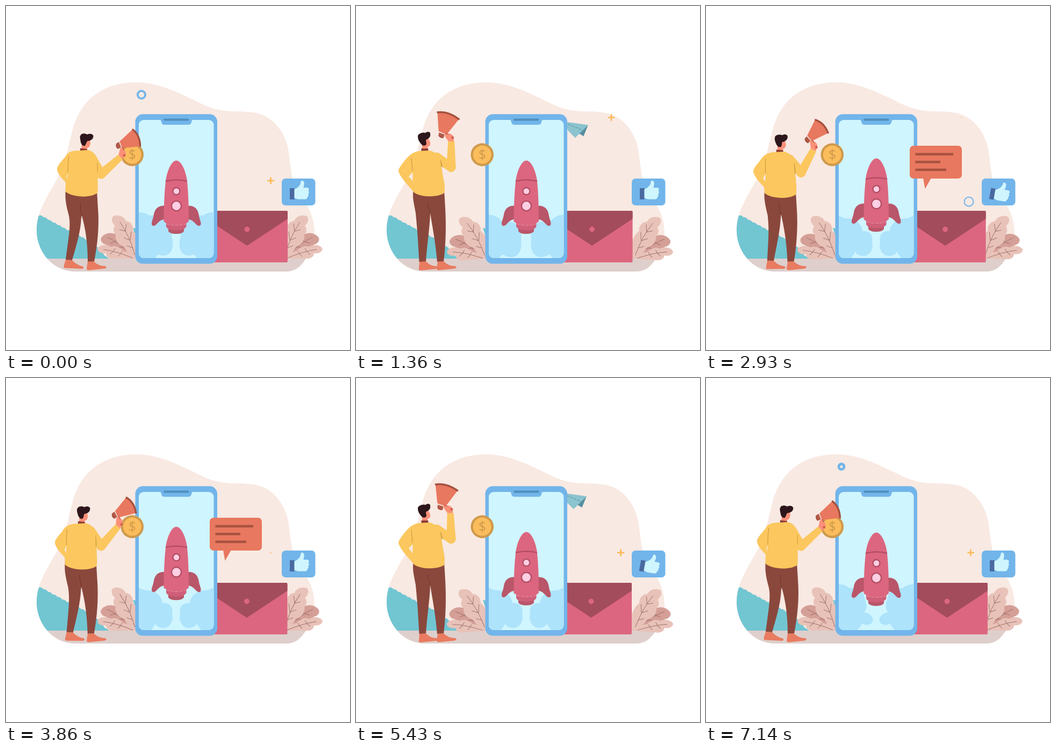
An HTML page with a canvas that plays this animation: 640x640 px, repeating every 7210 ms.

```html
<!DOCTYPE html>
<html lang="en">
<head>
<meta charset="utf-8">
<title>Rocket launch campaign</title>
<style>
html, body { margin: 0; width: 100%; height: 100%; overflow: hidden; background: #fff; }
canvas { display: block; width: 640px; height: 640px; }
</style>
</head>
<body>
<canvas id="stage"></canvas>
<script>
const LOOP = 7210, HALF = LOOP / 2, QUARTER = LOOP / 4;
const canvas = document.getElementById('stage');
const ctx = canvas.getContext('2d');
const dpr = window.devicePixelRatio || 1;
canvas.width = canvas.height = 640 * dpr;

const C = {
  blob: '#f8e9e2', ground: '#decfcc', teal: '#71c6d2', blue: '#72b5ea', bar: '#4f8fbd',
  screen: '#cff5ff', cloud: '#ade3fb', pink: '#dc667f', wine: '#b95669', ring: '#b34d65',
  glass: '#ffcfe3', flap: '#a34c5c', gold: '#cf9a4c', amber: '#fbbd5c', shirt: '#fbc75e',
  crease: '#c8963f', brown: '#8a483d', skin: '#fb9079', shoe: '#e97b60', hair: '#2d161b',
  horn: '#e8785f', rust: '#a4513f', leaf: '#e8c2b8', leafDark: '#d49f97', vein: '#a0736c',
  cuff: '#4a69a0', plus: '#fbba55', plane: '#8bc3cf', planeDark: '#568fa0'
};

// Helpers
const clamp = (v, a = 0, b = 1) => Math.min(b, Math.max(a, v));
const mix = (a, b, k) => a + (b - a) * k;
const smooth = (a, b, t) => { const k = clamp((t - a) / (b - a)); return k * k * (3 - 2 * k); };

function fill(path, color) {
  ctx.fillStyle = color;
  ctx.fill(new Path2D(path));
}
function line(path, color, width, cap = 'butt') {
  ctx.strokeStyle = color;
  ctx.lineWidth = width;
  ctx.lineCap = cap;
  ctx.lineJoin = 'round';
  ctx.stroke(new Path2D(path));
}
function disc(x, y, r, color) {
  ctx.fillStyle = color;
  ctx.beginPath();
  ctx.arc(x, y, r, 0, 7);
  ctx.fill();
}
function box(x, y, w, h, r, color) {
  ctx.fillStyle = color;
  ctx.beginPath();
  ctx.roundRect(x, y, w, h, r);
  ctx.fill();
}
function group(draw) {
  ctx.save();
  draw();
  ctx.restore();
}
function spin(x, y, deg) {
  ctx.translate(x, y);
  ctx.rotate(deg * Math.PI / 180);
  ctx.translate(-x, -y);
}
function mirror(axis) {
  ctx.translate(axis * 2, 0);
  ctx.scale(-1, 1);
}
// Blends two paths that share the same commands
function morph(p, q, k) {
  const to = q.match(/-?[\d.]+/g);
  let i = 0;
  return p.replace(/-?[\d.]+/g, n => mix(+n, +to[i++], k).toFixed(2));
}
// Monotone curve through [time, value] keys
function track(keys, t) {
  const n = keys.length - 1;
  if (t <= keys[0][0]) return keys[0][1];
  if (t >= keys[n][0]) return keys[n][1];
  const slope = i => (keys[i + 1][1] - keys[i][1]) / (keys[i + 1][0] - keys[i][0]);
  const tangent = i => {
    if (i === 0 || i === n) return 0;
    const a = slope(i - 1), b = slope(i);
    return a * b <= 0 ? 0 : 2 * a * b / (a + b);
  };
  let i = 0;
  while (t > keys[i + 1][0]) i++;
  const [t0, v0] = keys[i], [t1, v1] = keys[i + 1];
  const d = t1 - t0, k = (t - t0) / d, k2 = k * k, k3 = k2 * k;
  return (2 * k3 - 3 * k2 + 1) * v0 + (k3 - 2 * k2 + k) * d * tangent(i)
    + (3 * k2 - 2 * k3) * v1 + (k3 - k2) * d * tangent(i + 1);
}

// Backdrop
const BLOB = 'M243 142C285 142 325 163 366 183C410 203 430 192 465 199C498 205 521 237 526 272'
  + 'C531 310 531 335 556 366C570 385 574 405 574 425C573 440 565 460 558 470C548 485 538 494 522 494'
  + 'H130C85 494 57 455 57 417C57 380 80 350 97 318C112 288 117 255 124 230C140 170 185 142 243 142Z';
const SLOPE = [[58, 390], [88, 403.5], [119, 420], [145, 433], [170, 450], [192, 470]];

function grassPath() {
  let d = 'M50 470L50 389';
  for (let x = 58; x <= 192; x += 2) {
    d += `L${x} ${track(SLOPE, x) - 1.8 * Math.abs(Math.sin(x * 0.36))}`;
  }
  return d + 'L192 470Z';
}
const GRASS = grassPath();

function backdrop() {
  fill(BLOB, C.blob);
  group(() => {
    ctx.clip(new Path2D(BLOB));
    fill(GRASS, C.teal);
    ctx.fillStyle = C.ground;
    ctx.fillRect(50, 470, 530, 24);
  });
  fill('M236 413L248 415V445L241 428Z', C.teal);
}

function leaves(sway) {
  spin(240, 470, -5 * sway);
  fill('M250 470C225 470 205 465 198 458C190 457 186 448 187 444C178 443 174 434 178 430C184 422 198 420 206 426C214 424 222 432 224 440C232 446 240 458 250 470Z', C.leafDark);
  line('M188 430Q212 440 238 468M205 438L208 429M205 438L194 441M218 448L219 438M218 448L206 450', C.vein, 1);
  fill('M250 470L242 470C232 464 222 456 220 448C210 446 202 436 204 425C198 420 200 412 203 409C195 402 195 392 202 390C210 388 220 392 223 400C232 400 238 410 236 418C248 428 252 450 250 470Z', C.leaf);
  line('M212 402Q230 428 240 464M222 419L211 416M222 419L224 405M231 436L219 431M231 436L233 420M236 450L225 446', C.vein, 1);
  fill('M250 470L196 470C188 468 186 464 186 460C176 462 168 455 171 450C176 444 188 443 195 448C204 444 214 450 218 456C228 458 240 462 250 470Z', C.leaf);
  line('M181 453Q205 456 236 469M199 457L203 451M199 457L193 462M213 461L216 456M213 461L208 466', C.vein, 1);
}

function envelope(sway) {
  ctx.translate(-11 * sway, 0);
  box(373, 381, 151, 96, 2, C.pink);
  fill('M373 383Q373 381 375 381H522Q524 381 524 383V396L448.5 446L373 396Z', C.flap);
  disc(448.5, 415.5, 5, C.pink);
}

const PLANE = [[1050, -60], [1450, 12], [1825, 0], [1930, -22], [2050, -60]];
function paperPlane(t) {
  const d = track(PLANE, t);
  if (d < -45) return;
  ctx.translate(d, Math.max(d, -22) * 0.45);
  fill('M429 220L420.5 241L412 236Z', C.planeDark);
  fill('M385 214L429 220L405 244L392 231Z', C.plane);
  ctx.setLineDash([5, 2]);
  line('M392 219L420 230', C.planeDark, 1);
}

// Phone
const PUFF = {
  full: 'M240 480L240 386C250 381 262 386 267 390C280 388 292 390 300 395C312 405 309 420 308 428C312 440 311 456 303 461C296 466 288 465 284 462C280 464 279 468 276 475Z',
  soft: 'M240 480L240 387C250 385 262 387 272 391C285 389 295 392 300 397C309 405 307 420 307 428C312 440 312 456 305 461C298 467 288 467 280 461C276 465 274 467 272 475Z',
  round: 'M240 480L240 390C252 389 265 393 271 410C282 408 296 411 302 419C308 428 308 436 307 444C306 456 300 466 290 469C282 470 274 468 268 463C264 464 262 467 258 475Z',
  rest: 'M240 480L240 386C250 392 258 396 264 395C282 397 290 408 291 419C302 417 312 425 309 438C313 455 302 466 291 465C284 464 280 462 278 457C274 464 270 470 262 475Z',
  split: 'M240 480L240 386C250 381 262 386 267 391C278 389 288 392 293 402C294 412 304 424 294 436C310 438 316 452 305 458C298 461 294 459 291 456C288 464 282 468 274 475Z'
};
const PUFFS = [[0, 'full'], [710, 'soft'], [1930, 'round'], [2930, 'rest'], [5600, 'rest'], [7140, 'split'], [LOOP, 'full']];

function clouds(t) {
  let i = 0;
  while (t > PUFFS[i + 1][0]) i++;
  const [t0, a] = PUFFS[i], [t1, b] = PUFFS[i + 1];
  const path = morph(PUFF[a], PUFF[b], (t - t0) / (t1 - t0));
  fill(path, C.cloud);
  group(() => { mirror(316.5); fill(path, C.cloud); });
}

function rocket(t) {
  const u = clamp((t - 4000) / 1800, -1, 1);
  ctx.translate(0, -5.5 * (1 + Math.cos(u * Math.PI)));
  const fin = () => fill('M296 371.5C283 371 277 377 275 388C274 396 271 400 271 405C271 409.5 275 410.5 279 407C284 402 286 398 296 396.5Z', C.wine);
  fin();
  group(() => { mirror(316.8); fin(); });
  fill('M302 413H331V419Q328 424 316.5 424Q305 424 302 419Z', C.wine);
  fill('M298 403H335.5V410Q333 417 316.5 417.5Q300 417 298 410Z', '#cf5f78');
  fill('M317 287.5C327 288 335 309 337 326C339.5 350 340 375 340 401C330 410 304 410 293.5 401C293.5 375 294.5 350 297 326C299 309 307 288 317 287.5Z', C.pink);
  group(() => {
    ctx.setLineDash([6, 2]);
    line('M299 405.5Q317 411 335 405.5', '#eea3b4', 0.8);
  });
  line('M297 326Q317 321 337 326', C.ring, 2.5);
  for (const [y, r] of [[344.5, 7.7], [372, 10.3]]) {
    disc(317, y, r, C.ring);
    disc(317, y, r - 2.4, C.glass);
  }
}

function phone(t) {
  box(240.5, 201.3, 152.5, 278.3, 14, C.blue);
  group(() => {
    ctx.beginPath();
    ctx.roundRect(247, 212, 139.5, 257, 9);
    ctx.fillStyle = C.screen;
    ctx.fill();
    ctx.clip();
    clouds(t);
  });
  fill('M286 210Q288 212 289 216Q290 221 295 221H339Q344 221 345 216Q346 212 348 210Z', C.blue);
  line('M295 211.5H338.5', C.bar, 3.8, 'round');
  group(() => rocket(t));
}

// Floating items
function coin(t) {
  const k = 1 + 0.15 * Math.sin(Math.PI * clamp((t % QUARTER - 400) / 600));
  ctx.translate(234.8, 276.6);
  ctx.scale(k, k);
  disc(0, 0, 21.3, C.gold);
  disc(0, 0, 17, C.amber);
  ctx.fillStyle = C.gold;
  ctx.font = '25px "Open Sans", "Noto Sans", sans-serif';
  ctx.textAlign = 'center';
  ctx.fillText('$', 0, 8.6);
}

function bubble(t) {
  const k = smooth(2150, 2450, t) - smooth(4500, 4800, t);
  if (k <= 0) return;
  ctx.translate(408, 340);
  ctx.scale(k, k);
  ctx.translate(-408, -340);
  box(379, 260, 97, 61, 7, C.horn);
  fill('M404 320H419L407.5 340Z', C.horn);
  line('M389.5 275.7H460M389.5 290.3H436M389.5 304.7H447', '#a85241', 4.6);
}

function thumb(t) {
  const p = t % (LOOP / 3);
  box(513, 321, 62.5, 50, 7, C.blue);
  spin(532, 352, 10 * (smooth(100, 500, p) - smooth(750, 1150, p)));
  ctx.fillStyle = C.cuff;
  ctx.fillRect(528, 339, 8.7, 20.8);
  fill('M536.5 341C544 338 548 333 548.5 327C549 324 553 324 554.5 328C555.5 332 553.5 336 553.5 338H560C564 338 564.5 342 562.5 344C564.5 346 564 349 562 350C563.5 352 562.5 355 560.5 355.5C561 358 559 359.5 556 359.5H545C541 359.5 540 358 536.5 357.5Z', C.screen);
}

const SPOTS = [[252, 165], [423, 304], [489, 364]];
const RINGS = [[-160, 0], [310, 1], [810, 2], [1640, 0], [2140, 1], [2640, 2], [3900, 0],
  [4400, 1], [4900, 2], [5480, 0], [5980, 1], [6480, 2], [7050, 0]];
function rings(t) {
  for (const [born, spot] of RINGS) {
    const age = t - born;
    if (age <= 0 || age >= 440) continue;
    const outer = 9.5 * (1 - (1 - age / 440) ** 6.5);
    const width = Math.min(outer, (440 - age) / 72);
    ctx.strokeStyle = C.blue;
    ctx.lineWidth = width;
    ctx.beginPath();
    ctx.arc(...SPOTS[spot], outer - width / 2, 0, 7);
    ctx.stroke();
  }
}

function pluses(t) {
  const p = t % QUARTER;
  for (const [x, y, peak] of [[492.5, 325, 0], [298.5, 158, 700], [475, 207.5, 1400]]) {
    const off = Math.abs((p - peak + QUARTER * 1.5) % QUARTER - QUARTER / 2);
    const r = 6.5 * Math.cos(Math.min(1, off / 310) * Math.PI / 2);
    if (r > 0.1) line(`M${x - r} ${y}H${x + r}M${x} ${y - r}V${y + r}`, C.plus, r * 0.42);
  }
}

// Man
const BODY = [[0, 0], [255, 0.25], [710, 0.87], [1150, 1], [1930, 1], [2930, 0.44], [HALF, 0]];
const ARM = [[0, 0], [255, 0.15], [710, 0.64], [1150, 0.9], [1825, 0.96], [1950, 1], [2300, 0.88], [2930, 0.39], [HALF, 0]];

function legs(b) {
  fill(morph('M111 342C109 360 113 375 117 390C120 405 118 420 115 442L111 472L123 473C131 445 139 420 140 394L141 390C148 415 152 440 152 476L164 476C170 445 174 410 171 375L169 342Z',
    'M107 342C104 355 108 368 111 385C113 405 115 430 116 450L117.5 476L130 476C132 445 137 415 138 388L138 385C142 410 148 440 151 476L163 476C167 445 168 410 166 375L164 342Z', b), C.brown);
  line(morph('M138 366Q138 376 141 390', 'M133 366Q135 376 138 386', b), '#6d352d', 1);
  fill(morph('M111 472L108 482Q106 487 110 487.5L142 489Q146 487 143 484.5Q131 482 123 473Z',
    'M118 476L117 488Q116 492 120 492L150 489Q154 486 150 484Q138 484 130 475Z', b), C.shoe);
  fill('M152 475.5L150 488.5Q150 492 155 491.5L184 488.5Q189 486 185 484Q172 484 163 475Z', C.shoe);
}

function head(b) {
  fill(morph('M141 256L151 257L151 270L140 270Z', 'M123 255L133 255L133.5 269L123 269Z', b), C.skin);
  fill(morph('M148 250L156.5 250L157 256L155 262Q150 266 147 262Z',
    'M126 246L136 248L138.5 256L137 260Q133 264 126 260Z', b), C.skin);
  fill(morph('M138.5 250Q136 241 141 238Q147 236 151 239Q159 235.5 162.5 241Q163 250 151 251.5L148 258Q147 262 142 259Q139 256 138.5 250Z',
    'M117 251Q113 242 117 238.5Q123 234 129 236Q135 232 138 236Q140 246 130 249L131 257Q130 260 124 259.5Q120 256 117 251Z', b), C.hair);
}

// The bell opens wider as the arm goes up
function megaphone(a) {
  const open = smooth(0.6, 1, a);
  spin(209, 259, -25);
  ctx.translate(209, 259);
  ctx.scale(1 + 0.06 * open, 1 + 0.24 * open);
  ctx.translate(-209, -259);
  spin(209, 259, 25);
  fill('M211.5 252L235.5 229.5Q249 240 250 261L216 264.5Z', C.horn);
  line('M236 230Q249 240 249.7 260.5', C.rust, 3.4, 'round');
}

function forearm(a) {
  fill('M171.4 306.6L209 276.5L217 285.5L182.6 319.4Z', C.shirt);
  disc(177, 313, 8.6, C.shirt);
  group(() => megaphone(a));
  fill('M205 256L210 253L214 263L208 266Q203 262 205 256Z', C.rust);
  line('M206.5 256L210 265M209 255L212.5 263.5', '#d9705b', 0.8);
  fill('M209.5 277L212 266Q215 261 218 264L222 270Q224.5 276 220 281L216 284.5Z', C.skin);
  line('M217 263L219 268', C.rust, 1.2, 'round');
  disc(220, 278, 2.4, '#d0614f');
}

function man(t) {
  const p = t % HALF, b = track(BODY, p), a = track(ARM, p);
  legs(b);
  ctx.translate(0, 2.7 * Math.sin(Math.PI * b));
  head(b);
  fill(morph('M138 264.5L151 266L151 271L138 270Z', 'M121.5 265L134 265L135 270.5L121.5 270.5Z', b), '#8c3f34');
  fill(morph('M137 269C120 269 115 272 110 281C102 290 95 298 95 303C95 311 103 320 111 328L110.5 345C122 356 156 358 170 348C172 340 170 330 171 318L170 285C167 276 160 268 151 268Z',
    'M122 269.5C104 270 96 281 88 291C82 299 79 303 79 307C81 316 92 329 104 342L107 346C118 356 150 357 164 348C166 340 165 330 162 318L157 285C152 274 140 268 134 269Z', b), C.shirt);
  fill(morph('M115 310L112.5 317L113.5 323Z', 'M105.5 309L98 317L105.5 326Z', b), C.blob);
  line(morph('M117 279Q115 292 115 310', 'M103 283Q104 294 105 307', b), C.crease, 1);
  const sx = mix(160, 150, b), ey = mix(313, 299, a);
  line(`M${sx} ${mix(283, 281, b)}L177 ${ey}`, C.shirt, 17, 'round');
  fill(morph('M169.5 292L170.5 292L171 316L170 316Z', 'M157 287L158 287L161.5 301L158.5 298Z', b), C.crease);
  ctx.translate(0, ey - 313);
  spin(177, 313, -52 * a);
  forearm(a);
}

function render(t) {
  const sway = (1 - Math.cos(2 * Math.PI * t / HALF)) / 2;
  ctx.setTransform(dpr, 0, 0, dpr, 0, 0);
  ctx.fillStyle = '#fff';
  ctx.fillRect(0, 0, 640, 640);
  backdrop();
  group(() => leaves(sway));
  group(() => { mirror(379.5); leaves(sway); });
  group(() => envelope(sway));
  group(() => paperPlane(t % HALF));
  phone(t);
  rings(t);
  pluses(t);
  group(() => thumb(t));
  group(() => bubble(t));
  group(() => coin(t));
  group(() => man(t));
}

const start = performance.now();
function tick() {
  render((performance.now() - start) % LOOP);
  requestAnimationFrame(tick);
}
tick();
</script>
</body>
</html>
```
